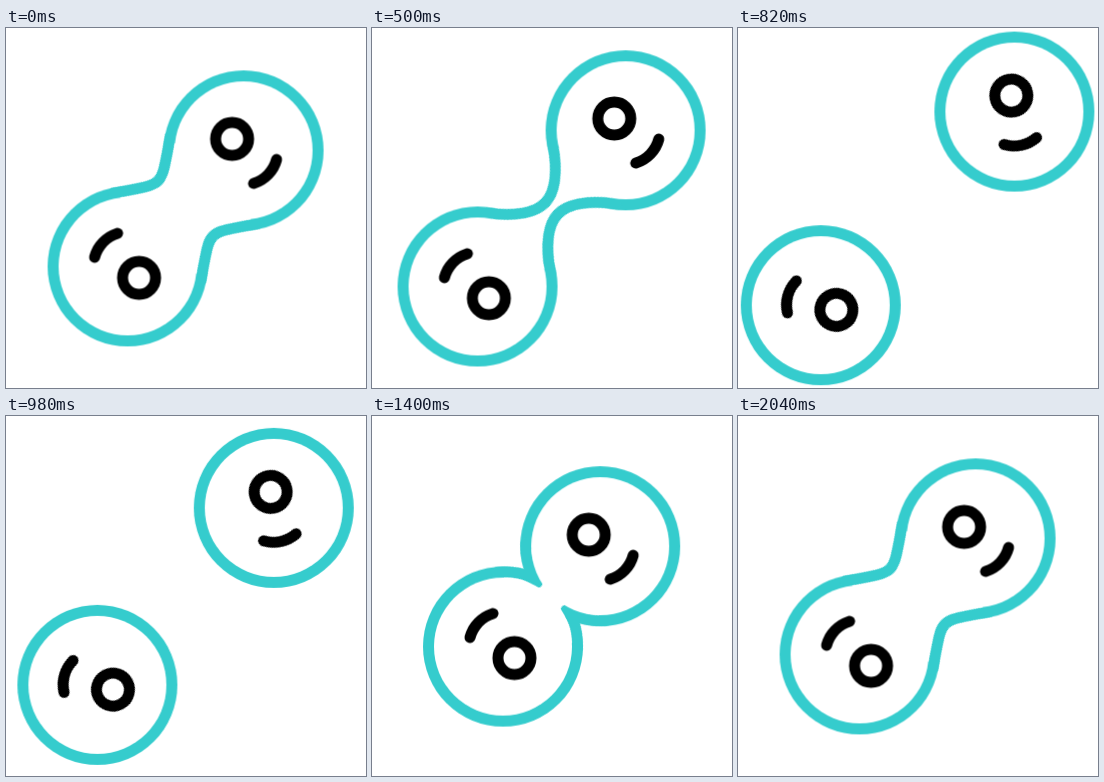
Write an HTML page without scripts that moves like this. It is 360 by 360 pixels and loops after 2400 ms.

```html
<!DOCTYPE html>
<html lang="en">
<head>
<meta charset="utf-8">
<title>Cell division</title>
<style>
  html, body { margin: 0; width: 100%; height: 100%; overflow: hidden; background: #fff; }
  svg { display: block; width: 100vw; height: 100vh; }

  .move, .spin, .axis, .neck, .burst { animation: 2400ms linear infinite; }
  .a { --s: 1; --turn: 35deg; }
  .b { --s: -1; --turn: -29deg; }
  .move { animation-name: move; }
  .spin { animation-name: spin; }
  .axis { animation-name: axis, link; }
  .neck { animation-name: neck; }
  .burst { animation-name: burst; }

  .rim { fill: #35cccd; }
  .body { fill: #fff; }
  .line { fill: none; stroke: #35cccd; stroke-width: 11; stroke-linecap: round; stroke-linejoin: round; }
  .line.neck { fill: #fff; }
  .ink { stroke: #000; }

  /* cell centres, mirrored by --s */
  @keyframes move {
    0%, .83%, 100% { transform: translate(calc(var(--s) * 58px), calc(var(--s) * -58px)); }
    13.33% { transform: translate(calc(var(--s) * 67.2px), calc(var(--s) * -69.2px)); }
    22.5% { transform: translate(calc(var(--s) * 75.5px), calc(var(--s) * -80px)); }
    28.33% { transform: translate(calc(var(--s) * 85px), calc(var(--s) * -87.2px)); animation-timing-function: ease-out; }
    33.33% { transform: translate(calc(var(--s) * 97px), calc(var(--s) * -97px)); animation-timing-function: ease-in; }
    40.83% { transform: translate(calc(var(--s) * 88.3px), calc(var(--s) * -88.6px)); }
    45% { transform: translate(calc(var(--s) * 79.5px), calc(var(--s) * -79.5px)); }
    55% { transform: translate(calc(var(--s) * 51px), calc(var(--s) * -52px)); }
    58.33% { transform: translate(calc(var(--s) * 48.6px), calc(var(--s) * -50.2px)); animation-timing-function: ease-in-out; }
    74.17% { transform: translate(calc(var(--s) * 55.2px), calc(var(--s) * -55.8px)); animation-timing-function: ease-out; }
    85% { transform: translate(calc(var(--s) * 58px), calc(var(--s) * -58px)); }
  }

  /* contents lead the outline a little, then turn while apart */
  @keyframes spin {
    0%, .83%, 54%, 100% { transform: translate(0, 0) rotate(0deg); }
    13.33% { transform: translate(calc(var(--s) * 1px), calc(var(--s) * -1.6px)) rotate(0deg); }
    22.5% { transform: translate(0, 0) rotate(0deg); }
    28.33% { transform: translate(0, 0) rotate(calc(var(--turn) * .5)); animation-timing-function: ease-out; }
    36.5% { transform: translate(0, 0) rotate(calc(var(--turn) * 1.04)); animation-timing-function: ease-in; }
    40.83% { transform: translate(0, 0) rotate(calc(var(--turn) * .97)); animation-timing-function: ease-in-out; }
  }

  @keyframes axis {
    0%, .83%, 85%, 100% { transform: rotate(-45deg); }
    13.33%, 58.33% { transform: rotate(-45.8deg); }
    22.5%, 23.6% { transform: rotate(-46.7deg); }
  }
  @keyframes link {
    0%, 23.6%, 55%, 100% { visibility: visible; }
    23.61%, 54.99% { visibility: hidden; }
  }

  /* one side of the bridge, from centre to centre; the bodies hide the inner ends */
  @keyframes neck {
    0%, .83%, 85%, 100% { d: path("M-82 -2L-39.8 61.5C-14 43.9 -8 39 0 39S14 43.9 39.8 61.5L82 -2"); }
    13.33% { d: path("M-97 -2L-47.1 55.4C-16 27.4 -9 20.5 0 20.5S16 27.4 47.1 55.4L97 -2"); }
    22.5% { d: path("M-110 -2L-48 41C-32.6 17.6 -15 6 0 6S32.6 17.6 48 41L110 -2"); }
    23.6% { d: path("M-111 -2L-49 40C-33 16 -16 4.5 0 4.5S33 16 49 40L111 -2"); }
    55% { d: path("M-72.8 -2L-20 52.5C-1 36 0 20 0 4S1 36 20 52.5L72.8 -2"); }
    58.33% { d: path("M-69.9 -2L-20 55.2C-1 38 -.5 27 0 21S1 38 20 55.2L69.9 -2"); animation-timing-function: ease-in-out; }
    74.17% { d: path("M-78.5 -2L-29.6 56.2C-8 37.5 -4.5 33.7 0 33.7S8 37.5 29.6 56.2L78.5 -2"); animation-timing-function: ease-out; }
  }

  @keyframes burst {
    0%, 23.6% { opacity: 0; stroke-dasharray: 0 99; stroke-dashoffset: 0; }
    23.61% { opacity: 1; stroke-dasharray: 0 99; stroke-dashoffset: 0; }
    28.33% { opacity: 1; stroke-dasharray: 12.5 99; stroke-dashoffset: -16; }
    33.33% { opacity: 1; stroke-dasharray: 0 99; stroke-dashoffset: -32; }
    33.34%, 100% { opacity: 0; stroke-dasharray: 0 99; stroke-dashoffset: -32; }
  }
</style>
</head>
<body>
<svg viewBox="0 0 360 360">
  <defs>
    <g id="core" class="line ink">
      <circle cx="-11.5" cy="-11.5" r="16.5"/>
      <path d="M33 9A34.3 34.3 0 0 1 10 33"/>
    </g>
  </defs>
  <g transform="translate(179.6 180.4)">
    <circle class="move rim a" r="80"/>
    <circle class="move rim b" r="80"/>
    <g class="axis">
      <path class="neck line" d="M-82 -2L-39.8 61.5C-14 43.9 -8 39 0 39S14 43.9 39.8 61.5L82 -2"/>
      <g transform="scale(1 -1)">
        <path class="neck line" d="M-82 -2L-39.8 61.5C-14 43.9 -8 39 0 39S14 43.9 39.8 61.5L82 -2"/>
      </g>
    </g>
    <circle class="move body a" r="69"/>
    <circle class="move body b" r="69"/>
    <g class="move a"><g class="spin"><use href="#core"/></g></g>
    <g class="move b"><g class="spin"><use href="#core" transform="rotate(180)"/></g></g>
  </g>
  <path class="burst line" d="M157 168.8L108 172.5M166 161V112M163.9 164.7L127 131.5M210 211.3L262 207M206 217.4L243 250.2M199.7 223L203.7 271"/>
</svg>
</body>
</html>
```
